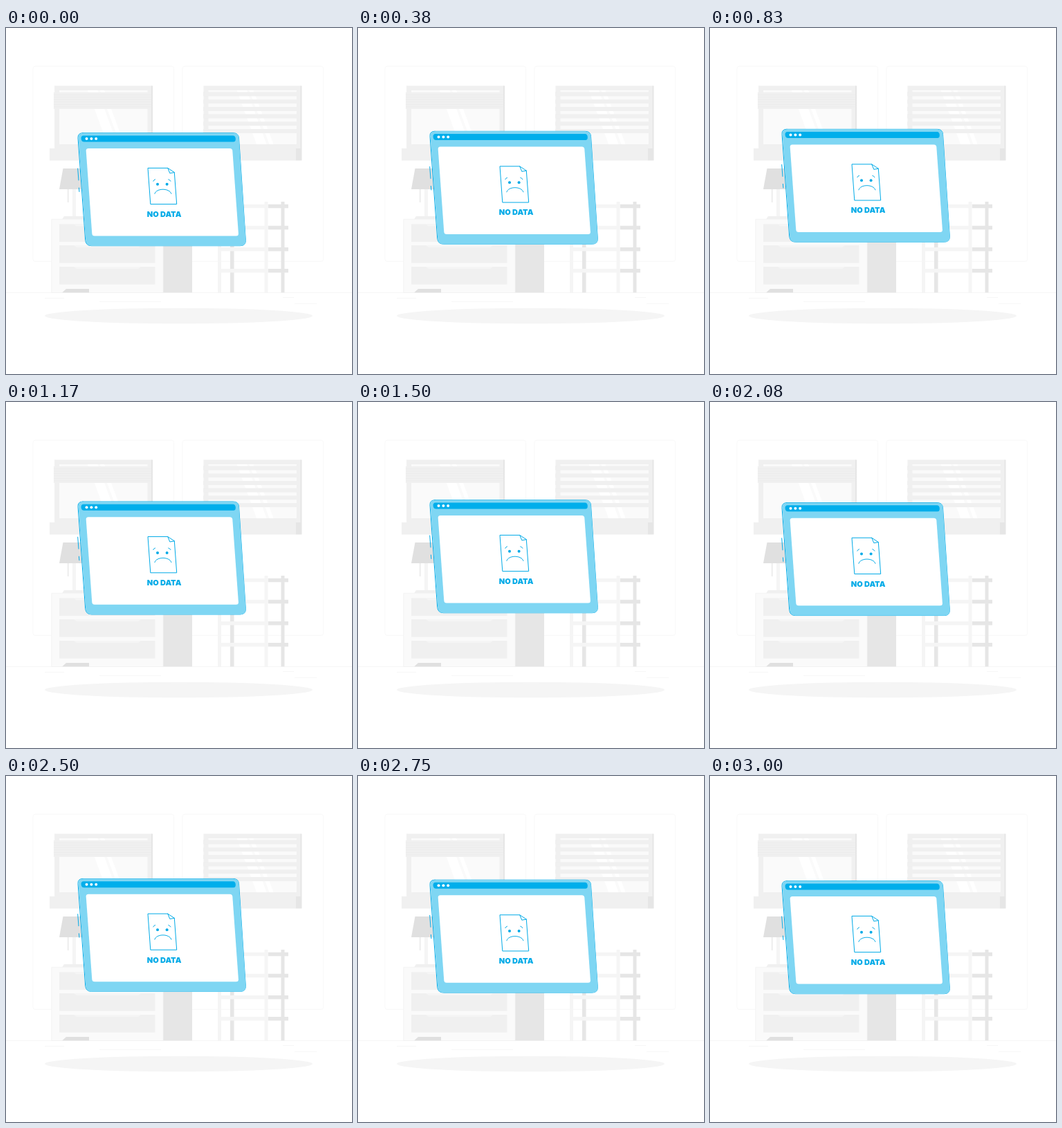
An HTML page that plays this animation: 500x500 px, repeating every 3040 ms.

```html
<!DOCTYPE html>
<html lang="en">
<head>
<meta charset="utf-8">
<title>No data</title>
<style>
  html, body { margin: 0; width: 100%; height: 100%; overflow: hidden; background: #fff; }
  svg { display: block; width: 100%; height: 100%; }
  .float { animation: float 3040ms linear infinite; }
  /* 1.5 s up, 1.5 s down, then a short rest */
  @keyframes float {
    0%, 98.684%, 100% { transform: translateY(0); }
    49.342% { transform: translateY(-10px); }
  }
  .line { fill: none; stroke: #00aae7; stroke-width: 1; stroke-linecap: round; stroke-linejoin: round; }
  .label { font: 900 11px Inter, "Open Sans", sans-serif; fill: #00aae7; text-anchor: middle; }
</style>
</head>
<body>
<svg viewBox="0 0 500 500" xmlns="http://www.w3.org/2000/svg">
  <defs>
    <g id="window">
      <path fill="#f0f0f0" d="M70 83.5H211V174H70z"/>
      <path fill="#e6e6e6" d="M210 83.5H212V174H210z"/>
      <path fill="#fafafa" d="M77 90H204.500V168H77z"/>
      <path fill="#fff" d="M118 90H132.500L161 168H146.500zM136 90H142L171 168H165z"/>
      <path fill="#f0f0f0" d="M63 174H203V191.500H63z"/>
      <path fill="#e6e6e6" d="M203 174H212V191.500H203z"/>
    </g>
    <g id="drawer">
      <path fill="#f0f0f0" d="M77 0H215.500V25.500H77z"/>
      <path fill="#f5f5f5" d="M98 0H195L191.500 3H101.500z"/>
    </g>
    <g id="shelf">
      <path fill="#f5f5f5" d="M306 0H378V5.500H306z"/>
      <path fill="#e6e6e6" d="M378.500 0H408V5.500H378.500z"/>
    </g>
    <path id="slat" fill="#f0f0f0" d="M285 0H421V6H285z"/>
    <path id="fold" fill="#ebebeb" d="M69 0H210V.8H69z"/>
  </defs>

  <g fill="none" stroke="#f5f5f5" stroke-width=".7">
    <rect x="39" y="55.300" width="203.500" height="282" rx="3"/>
    <rect x="255" y="55.300" width="203.500" height="282" rx="3"/>
  </g>

  <use href="#window"/>
  <path fill="#f0f0f0" d="M69 93H210V117H69z"/>
  <use href="#fold" y="96"/>
  <use href="#fold" y="99.500"/>
  <use href="#fold" y="103"/>
  <use href="#fold" y="106.500"/>
  <use href="#fold" y="110"/>
  <use href="#fold" y="113.500"/>

  <use href="#window" x="215.500"/>
  <use href="#slat" y="92.500"/>
  <use href="#slat" y="103.200"/>
  <use href="#slat" y="113.900"/>
  <use href="#slat" y="124.600"/>
  <use href="#slat" y="135.300"/>
  <use href="#slat" y="146"/>

  <!-- lamp -->
  <path fill="#f0f0f0" d="M88.500 233H91V252H88.500z"/>
  <path fill="#f5f5f5" d="M96 233H101V272H96z"/>
  <path fill="#f0f0f0" d="M84 272H114L117 276.500H81z"/>
  <path fill="#e0e0e0" d="M82.500 203H118L123 233H77z"/>

  <!-- dresser -->
  <path fill="#e6e6e6" d="M227 276H269V382.500H227z"/>
  <path fill="#fafafa" stroke="#f3f3f3" stroke-width=".7" d="M65.800 276.300H227V382.500H65.800z"/>
  <use href="#drawer" y="283.500"/>
  <use href="#drawer" y="314"/>
  <use href="#drawer" y="345"/>
  <path fill="#e0e0e0" d="M87 377H120V382.500H81z"/>

  <!-- rack -->
  <path fill="#e6e6e6" d="M324 251H329.500V382.500H324zM397.500 251H402.500V382.500H397.500z"/>
  <use href="#shelf" y="254.800"/>
  <use href="#shelf" y="285.800"/>
  <use href="#shelf" y="317"/>
  <use href="#shelf" y="348"/>
  <path fill="#f5f5f5" d="M306 251H311V382.500H306zM373.500 251H378.500V382.500H373.500z"/>

  <path fill="none" stroke="#f0f0f0" stroke-width=".6" d="M0 382.500H500M135 395.300H224M56 390.500H84M400 389.500H416M417 398.300H449"/>
  <ellipse cx="249.500" cy="416" rx="193.500" ry="11.300" fill="#f5f5f5"/>

  <g class="float">
    <path class="line" d="M103.700 203L105 220M105.400 231L105.900 236.500"/>
    <path class="line" d="M111 151.700H328Q336 151.700 336.500 159L346.300 306.500Q346.700 314.700 338.500 314.700H123.500Q115.400 314.700 114.700 306.500L104 159Q103.600 151.700 111 151.700z"/>
    <path fill="#7fd6f3" d="M111.500 151.800H328Q336 151.800 336.500 159L346.500 306.500Q347 315 338.500 315H124Q115.900 315 115.200 306.500L104.600 159Q104.200 151.800 111.500 151.800z"/>
    <path fill="#00aeeb" d="M112 155.500H328Q331.500 155.500 331.800 160T328.500 164.500H113Q109 164.500 108.600 160T112 155.500z"/>
    <g fill="#fff">
      <circle cx="116.500" cy="160" r="2"/>
      <circle cx="123.400" cy="160" r="2"/>
      <circle cx="130.200" cy="160" r="2"/>
      <path d="M119 174H323.500Q327 174 327.300 177.500L335.900 297Q336.100 300.500 332.500 300.500H128Q124.600 300.500 124.300 297L115.700 177.500Q115.500 174 119 174z"/>
    </g>

    <path class="line" d="M205.400 202.400H233.700L243.300 208.700L246.700 254.600H209.200zM233.700 202.400L236.800 209.900L243.300 208.700"/>
    <g fill="#00aae7">
      <circle cx="219" cy="225.700" r="2"/>
      <circle cx="232.600" cy="225.700" r="2"/>
    </g>
    <path class="line" d="M212.800 221.300Q213.500 219.500 215.500 218.800M234.800 218.800Q237 219.500 237.900 221.300"/>
    <path class="line" stroke-width="1.200" d="M214.900 239.500C217 231 236.500 231 238.900 239.500"/>
    <text class="label" x="228.600" y="273">NO DATA</text>
  </g>
</svg>
</body>
</html>
```
